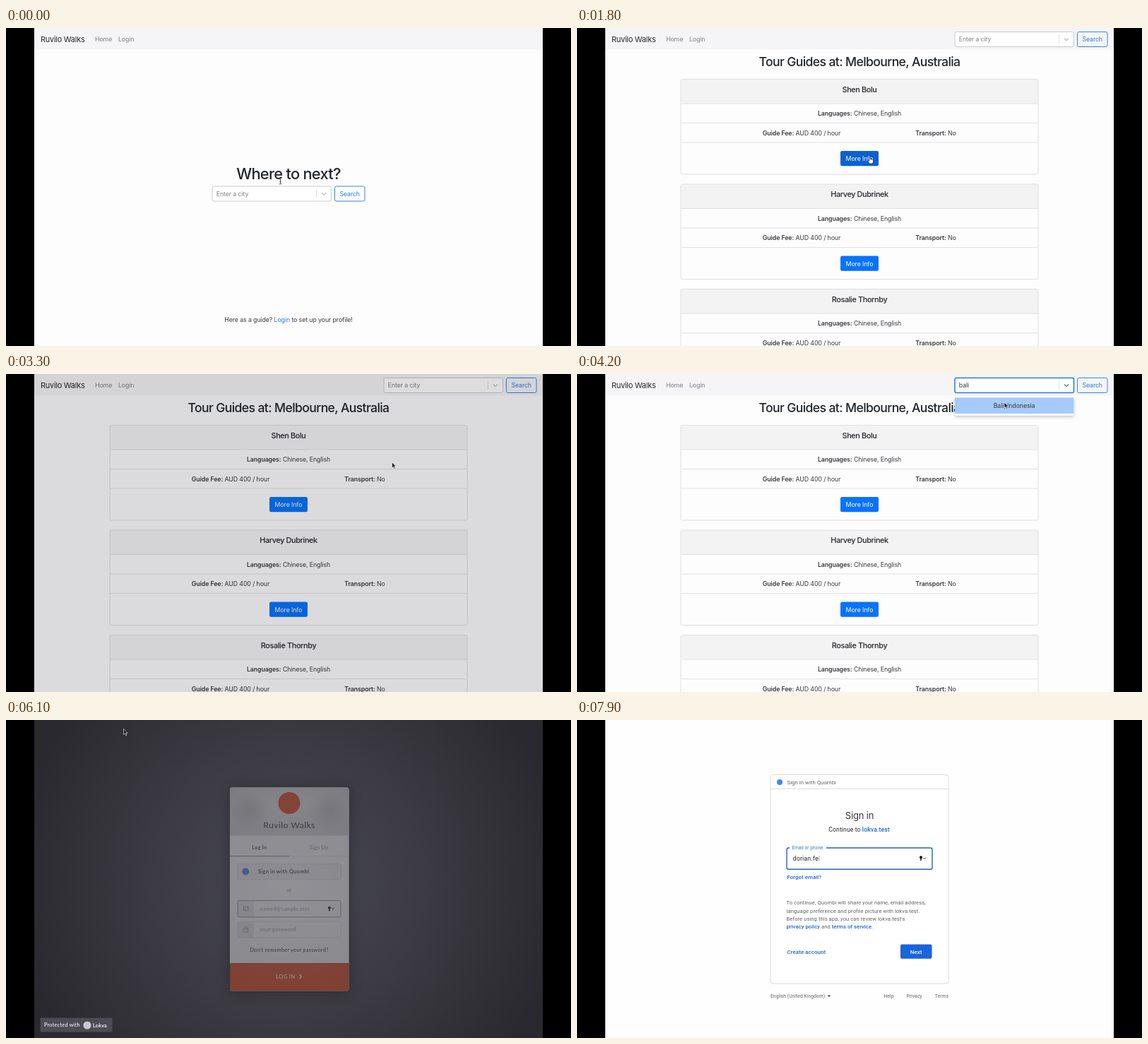
These frames come from a looping animation (800 px wide and 450 px high, 8000 ms). An HTML page:

```html
<!DOCTYPE html>
<html lang="en">
<head>
<meta charset="utf-8">
<title>Guide booking walkthrough</title>
<style>
html, body { margin: 0; width: 100%; height: 100%; overflow: hidden; background: #000; }
svg { display: block; width: 100vw; height: 100vh; }
text { font-family: Inter, "Liberation Sans", sans-serif; letter-spacing: -.012em; fill: #38393c; white-space: pre; }
.mid { text-anchor: middle; }
.end { text-anchor: end; }
.head { letter-spacing: -.035em; font-weight: 500; fill: #212529; }
.brand { letter-spacing: -.025em; fill: #29292b; }
.lato { font-family: Lato, "Open Sans", sans-serif; letter-spacing: .03em; }
.rob { font-family: Roboto, "Liberation Sans", sans-serif; letter-spacing: .01em; fill: #5f6368; }
.med { font-weight: 500; }
.bold { font-weight: 600; }
.key { fill: #1a66d6; font-weight: 500; }
.ink { fill: #27282b; }
.grey { fill: #808083; }
.faint { fill: #a0a0a3; }
.blue { fill: #2b7fdd; }
.white { fill: #fff; }
</style>
</head>
<body>
<svg id="stage" viewBox="0 0 800 450" xmlns="http://www.w3.org/2000/svg">
  <defs>
    <radialGradient id="dusk" gradientUnits="userSpaceOnUse" cx="400" cy="225" r="390">
      <stop offset="0" stop-color="#494952"/><stop offset=".5" stop-color="#3c3b43"/><stop offset="1" stop-color="#2a292f"/>
    </radialGradient>
    <radialGradient id="haze" cx=".5" cy=".35" r=".62">
      <stop offset="0" stop-color="#efefef"/><stop offset="1" stop-color="#d9d9da"/>
    </radialGradient>
    <radialGradient id="smudge">
      <stop offset="0" stop-color="#b4b4b6" stop-opacity=".6"/><stop offset="1" stop-color="#b4b4b6" stop-opacity="0"/>
    </radialGradient>
    <filter id="soft" x="-20%" y="-20%" width="140%" height="150%">
      <feDropShadow dx="0" dy="2" stdDeviation="2" flood-opacity=".22"/>
    </filter>
    <filter id="deep" x="-30%" y="-20%" width="160%" height="140%">
      <feDropShadow dx="0" dy="2" stdDeviation="10" flood-opacity=".75"/>
    </filter>
  </defs>
  <g id="view"></g>
  <path d="M0 0h40v450H0zM760 0h40v450h-40z"/>
</svg>
<script>
const LOOP = 8000, STEP = 100;
const APP = 'Ruvilo Walks', IDP = 'Quombi', LOCK = 'Lokva', SITE = 'lokva.test';
const GUIDES = ['Shen Bolu', 'Harvey Dubrinek', 'Rosalie Thornby'];
const CITIES = ['Melbourne, Australia', 'Bali, Indonesia', 'Sydney, Australia', 'Tokyo, Japan',
  'Lisbon, Portugal', 'Rome, Italy', 'Seoul, South Korea'];
const view = document.getElementById('view');

const clamp = v => Math.max(0, Math.min(1, v));
const ramp = (t, from, len) => clamp((t - from) / len);
const smooth = p => p * p * (3 - 2 * p);
const typed = (word, t, start, gap) => word.slice(0, Math.max(0, Math.floor((t - start) / gap) + 1));

const text = (x, y, size, str, cls = '') => `<text x="${x}" y="${y}" font-size="${size}" class="${cls}">${str}</text>`;
const span = (str, cls) => `<tspan class="${cls}">${str}</tspan>`;
const rect = (x, y, w, h, fill, more = '') => `<rect x="${x}" y="${y}" width="${w}" height="${h}" fill="${fill}" ${more}/>`;
const path = (d, color, width = 1) => `<path d="${d}" fill="none" stroke="${color}" stroke-width="${width}"/>`;
const dot = (x, y, r, fill) => `<circle cx="${x}" cy="${y}" r="${r}" fill="${fill}"/>`;
const group = (x, y, body, more = '') => `<g transform="translate(${x} ${y})" ${more}>${body}</g>`;
const page = fill => rect(40, 0, 720, 450, fill);

function navbar() {
  return page('#fdfdfe') + rect(40, 0, 720, 30.5, '#f5f5f7') +
    text(49, 19.8, 11, APP, 'brand') +
    text(126, 19.2, 8.8, 'Home', 'grey') + text(159, 19.2, 8.8, 'Login', 'grey');
}

// City picker with its button, drawn from the picker's top left corner
function picker(x, y, { value = '', focus = false, open = false, active = -1, hot = false }) {
  let out = rect(.5, .5, 168.5, 21, '#fff', `rx="2.3" stroke="${focus ? '#2a78e4' : '#cbcbce'}" stroke-width="${focus ? 1.5 : 1}"`) +
    path('M148 5v11.5', '#cfcfd2', .7) +
    path('M155.4 9.6l3.1 3 3.1-3', focus ? '#66666a' : '#bcbcc0', 1.3) +
    (value ? text(6.3, 14.2, 8.8, value) : text(6.3, 14.2, 8.8, 'Enter a city', 'grey')) +
    rect(174, .5, 42.5, 21, hot ? '#2b7fe6' : 'none', 'rx="2.3" stroke="#3787e2"') +
    text(195.2, 14.2, 8.8, 'Search', 'mid ' + (hot ? 'white' : 'blue'));
  if (open) {
    const list = CITIES.filter(c => c.toLowerCase().startsWith(value));
    out += rect(.5, 26, 168.5, list.length * 22.8 + 5, '#fff', 'rx="2.3" filter="url(#soft)"');
    list.forEach((city, i) => {
      const top = 28.3 + i * 22.8;
      if (i === 0) out += rect(.5, top, 168.5, 22.8, active === 0 ? '#a6cafa' : '#deebff');
      out += text(84.5, top + 14.6, 8.8, city, 'mid');
    });
  }
  return group(x, y, out);
}

const invite = () => text(400, 416.3, 8.8, `Here as a guide? ${span('Login', 'blue')} to set up your profile!`, 'mid');

function home(t) {
  const done = t >= 800;
  return navbar() + text(400, 214, 21.9, 'Where to next?', 'head mid') + invite() +
    picker(291.5, 223.5, {
      value: done ? CITIES[0] : typed('mel', t, 400, 100),
      focus: t >= 200, open: t >= 200 && !done, active: t >= 700 ? 0 : -1, hot: t >= 1000
    });
}

function card(name, y, hot) {
  const edge = '#dfdfe2';
  return group(147, y,
    rect(0, 0, 506, 134.5, '#fdfdfe', 'rx="2.3"') + rect(0, 0, 506, 34.5, '#f4f3f4', 'rx="2.3"') +
    path('M0 34.5H506M0 62H506M0 89.5H506', edge, .9) +
    rect(0, 0, 506, 134.5, 'none', `rx="2.3" stroke="${edge}"`) +
    text(253, 18.3, 10.9, name, 'mid head') +
    text(253, 51.7, 8.8, span('Languages:', 'bold') + ' Chinese, English', 'mid') +
    text(171, 79.2, 8.8, span('Guide Fee:', 'bold') + ' AUD 400 / hour', 'mid') +
    text(361, 79.2, 8.8, span('Transport:', 'bold') + ' No', 'mid') +
    rect(226, 101.5, 54, 21.3, hot ? '#0b60d2' : '#0873fb', 'rx="2.3"') +
    text(253, 115.5, 8.8, 'More Info', 'mid white'));
}

function modal(t) {
  const closing = t >= 3000;
  const shade = closing ? 1 - ramp(t, 3150, 200) : ramp(t, 1850, 150);
  const show = smooth(closing ? 1 - ramp(t, 2950, 250) : ramp(t, 1850, 300));
  if (!shade) return '';
  const first = GUIDES[0];
  const body = rect(260, 147.8, 280, 154.8, '#fff', 'rx="2.6"') +
    path('M260 186h280M260 263h280', '#e2e3e6', .9) +
    text(269, 171.5, 13.1, first + "'s Information", 'head') +
    path('M524 162.2l4.8 4.8m0-4.8l-4.8 4.8', '#222', 1.6) +
    text(269, 205.2, 8.8, `Hi, my name is ${first}, call me Bobbie!`) +
    text(269, 236.7, 8.8, `${span('Email:', 'bold')} ${span('bobbie@sample.test', 'blue')}`) +
    text(269, 250.2, 8.8, `${span('Mobile:', 'bold')} ${span('5550104826', 'blue')}`) +
    rect(427.5, 272.3, 103.5, 21.2, '#90969b', 'rx="2.3"') +
    text(479.2, 286.2, 8.8, 'Make an Appointment', 'mid white');
  return `<g opacity="${shade * .53}">${page('#050009')}</g>` + group(0, -28 * (1 - show), body, `opacity="${show}"`);
}

function results(t) {
  const bali = t >= 4600;
  const cleared = t < 1200 || (t >= 4500 && !bali);
  let out = navbar();
  if (!cleared) {
    out += text(400, 54.4, 17.6, 'Tour Guides at: ' + CITIES[bali ? 1 : 0], 'head mid');
    out += bali ? invite() : GUIDES.map((g, i) => card(g, 72.5 + i * 148.5, i === 0 && t >= 1600 && t < 2300)).join('');
  }
  const using = t >= 3700 && t < 4500;
  out += picker(534.5, 5, {
    value: !using ? '' : t >= 4300 ? CITIES[1] : typed('bali', t, 3800, 100),
    focus: using, open: using && t < 4300, active: t >= 4200 ? 0 : -1, hot: t >= 4500 && t < 4800
  });
  return out + modal(t);
}

const keyIcon = (x, y) => dot(x, y - 1.2, 2, '#111') + path(`M${x} ${y - 1}v4.5`, '#111', 1.5) +
  path(`M${x + 3} ${y - .8}l2 2 2-2`, '#333', 1);

// Login form row with an icon cell on the left
const field = (y, h, edge, hint) => rect(328, y, 146, h, '#fff', 'rx="1.7"') + rect(328, y, 23, h, '#ececed') +
  rect(328, y, 146, h, 'none', `rx="1.7" stroke="${edge}" stroke-width=".9"`) +
  text(359, y + 14.1, 7.6, hint, 'lato faint');

function login(t) {
  const show = smooth(ramp(t, 5950, 350));
  const hot = t >= 6500;
  const box = rect(317, 81, 168.5, 288, '#fff', 'rx="3" filter="url(#deep)"') +
    '<path d="M317 149V84q0-3 3-3h162.5q3 0 3 3v65z" fill="url(#haze)"/>' +
    dot(344, 114, 27, 'url(#smudge)') + dot(458, 114, 27, 'url(#smudge)') +
    dot(401, 103, 15.5, '#e64a1d') +
    text(401, 138.6, 12.3, APP, 'lato mid') +
    text(359, 168.4, 7.3, 'Log In', 'lato mid bold') + text(443, 168.4, 7.3, 'Sign Up', 'lato mid bold faint') +
    path('M317 178.2h168.5', '#e3e3e6', .8) + path('M317 178.2h84', '#868d99', 1) +
    rect(328, 189, 146.5, 22, hot ? '#ebebec' : '#f4f4f5', 'rx="1.7" stroke="#d9d9db" stroke-width=".7"') +
    dot(339.3, 200, 5, '#4285f4') +
    text(357, 202.8, 7.6, 'Sign in with ' + IDP, 'lato bold') +
    text(401, 228, 7.5, 'or', 'lato mid grey') +
    field(241, 23.3, '#88888c', 'named@sample.test') + keyIcon(458, 252.3) +
    rect(336.5, 249.5, 6.5, 5.5, 'none', 'stroke="#929296" stroke-width=".8"') +
    path('M337 254.5l5.5-4.5', '#929296', .8) +
    field(270.5, 23, '#e4e4e6', 'your password') +
    rect(336.7, 281, 6, 4.7, 'none', 'stroke="#929296" stroke-width=".8"') +
    path('M338 281v-1.5a1.7 1.7 0 0 1 3.4 0v1.5', '#929296', .8) +
    text(401, 313.2, 7.35, "Don't remember your password?", 'lato mid') +
    '<path d="M317 329.5h168.5V366q0 3-3 3H320q-3 0-3-3z" fill="#e7481d"/>' +
    rect(317.5, 330, 167.5, 38.5, 'none', 'rx="2" stroke="#4a2a20" stroke-width=".6" stroke-dasharray="1 1"') +
    text(382, 351.2, 7.9, 'LOG IN', 'lato white bold') + path('M415.5 345.7l2.9 2.9-2.9 2.9', '#fff', 1.4);
  const badge = rect(48.5, 421.5, 102, 20, '#4d4c55', 'rx="1.5"') +
    text(54, 434.4, 7.4, 'Protected with', 'lato white') + dot(115, 432, 5.6, '#c9c9cf') +
    text(123, 434.8, 7.3, LOCK, 'lato white bold');
  return page('url(#dusk)') + badge + group(0, 24 * (1 - show), box, `opacity="${show}"`);
}

function signIn(t) {
  const entry = typed('dorian.fe', t, 7100, 100);
  const policy = [
    `To continue, ${IDP} will share your name, email address,`,
    `language preference and profile picture with ${SITE}.`,
    `Before using this app, you can review ${SITE}'s`,
    `${span('privacy policy', 'key')} and ${span('terms of service', 'key')}.`
  ];
  return page('#fefefe') +
    rect(274, 77.5, 252, 295.5, '#fff', 'rx="4" stroke="#dadce0"') + path('M274 97.3h252', '#d6d8dc', .9) +
    dot(287, 88, 4, '#4285f4') + text(297.5, 91, 7.7, 'Sign in with ' + IDP, 'rob') +
    text(400, 140, 13, 'Sign in', 'mid') +
    text(399.5, 158.2, 8.7, `Continue to ${span(SITE, 'key')}`, 'rob mid ink') +
    rect(297, 181, 206, 30.3, '#fff', 'rx="2.2" stroke="#2464c4" stroke-width="1.4"') +
    rect(301, 179, 52, 4, '#fff') + text(304.5, 183, 6.5, 'Email or phone', 'rob blue') +
    text(305.5, 199.3, 9, entry + span('|', 'grey'), 'rob ink') +
    keyIcon(487, 195.5) +
    text(297.5, 225.3, 7.8, 'Forgot email?', 'rob key') +
    policy.map((line, i) => text(296.5, 261.2 + i * 11.3, 7.6, line, 'rob')).join('') +
    text(297.5, 330.8, 7.9, 'Create account', 'rob key') +
    rect(458, 317.5, 44.5, 20.3, '#1a64dc', 'rx="2.2"') + text(480.2, 330.6, 7.9, 'Next', 'rob mid med white') +
    text(274, 393, 6.7, 'English (United Kingdom)', 'rob') + '<path d="M354.5 389.5h5l-2.5 2.6z" fill="#444"/>' +
    text(434.5, 393, 6.7, 'Help', 'rob') + text(466.5, 393, 6.7, 'Privacy', 'rob') + text(526, 393, 6.7, 'Terms', 'rob end');
}

const SHAPES = {
  beam: path('M-1.8-4.5q1.8 0 1.8 1.5V3q0 1.5-1.8 1.5M1.8-4.5Q0-4.5 0-3M0 3q0 1.5 1.8 1.5M-1 .8h2', '#444', .9),
  arrow: '<path d="M-1.5-4v8l1.8-1.6 1.3 2.9 1.3-.6-1.3-2.8h2.5z" fill="#111" stroke="#fff" stroke-width=".6"/>',
  hand: '<path d="M-1.8-4.4q1-.8 1.7.3v3q.8-.7 1.5.1.8-.5 1.4.3 1-.4 1.3.6V2L3 5h-4.3L-3.7 1.5q-.3-1.4 1-1l.9.9z" fill="#fff" stroke="#222" stroke-width=".8"/>',
  none: ''
};

// Pointer stops: time, x, y, look until the next stop
const STOPS = [
  [0, 388.5, 216.5, 'beam'], [200, 372, 234, 'beam'], [400, 372, 234, 'none'], [600, 376, 261, 'arrow'],
  [800, 376, 261, 'arrow'], [1000, 484, 237, 'hand'], [1200, 484, 237, 'arrow'], [1600, 415.5, 187, 'hand'],
  [2200, 415.5, 187, 'arrow'], [2800, 530, 168.5, 'hand'], [3100, 530, 168.5, 'arrow'], [3700, 600, 16, 'beam'],
  [3800, 600, 16, 'none'], [4100, 606.5, 44, 'arrow'], [4300, 606.5, 44, 'arrow'], [4500, 729, 17, 'hand'],
  [4700, 729, 17, 'arrow'], [5300, 168, 16.5, 'hand'], [5800, 168, 16.5, 'arrow'], [6100, 168, 16.5, 'arrow'],
  [6500, 368, 205.5, 'hand'], [7000, 368, 205.5, 'arrow'], [7100, 368, 205.5, 'none'], [LOOP, 368, 205.5, 'none']
];

function pointer(t) {
  const i = STOPS.findIndex(s => s[0] > t) - 1;
  const [t0, x0, y0, look] = STOPS[i], [t1, x1, y1] = STOPS[i + 1];
  const p = smooth((t - t0) / (t1 - t0));
  return group(x0 + (x1 - x0) * p, y0 + (y1 - y0) * p, SHAPES[look]);
}

function scene(t) {
  if (t < 1100) return home(t);
  if (t < 5800) return results(t);
  if (t < 6000) return page('#fefefe');
  return t < 7000 ? login(t) : signIn(t);
}

let last = -1;
function tick(now) {
  const t = Math.floor((now % LOOP) / STEP) * STEP;
  if (t !== last) view.innerHTML = scene(t) + pointer(t);
  last = t;
  requestAnimationFrame(tick);
}
tick(0);
</script>
</body>
</html>
```
